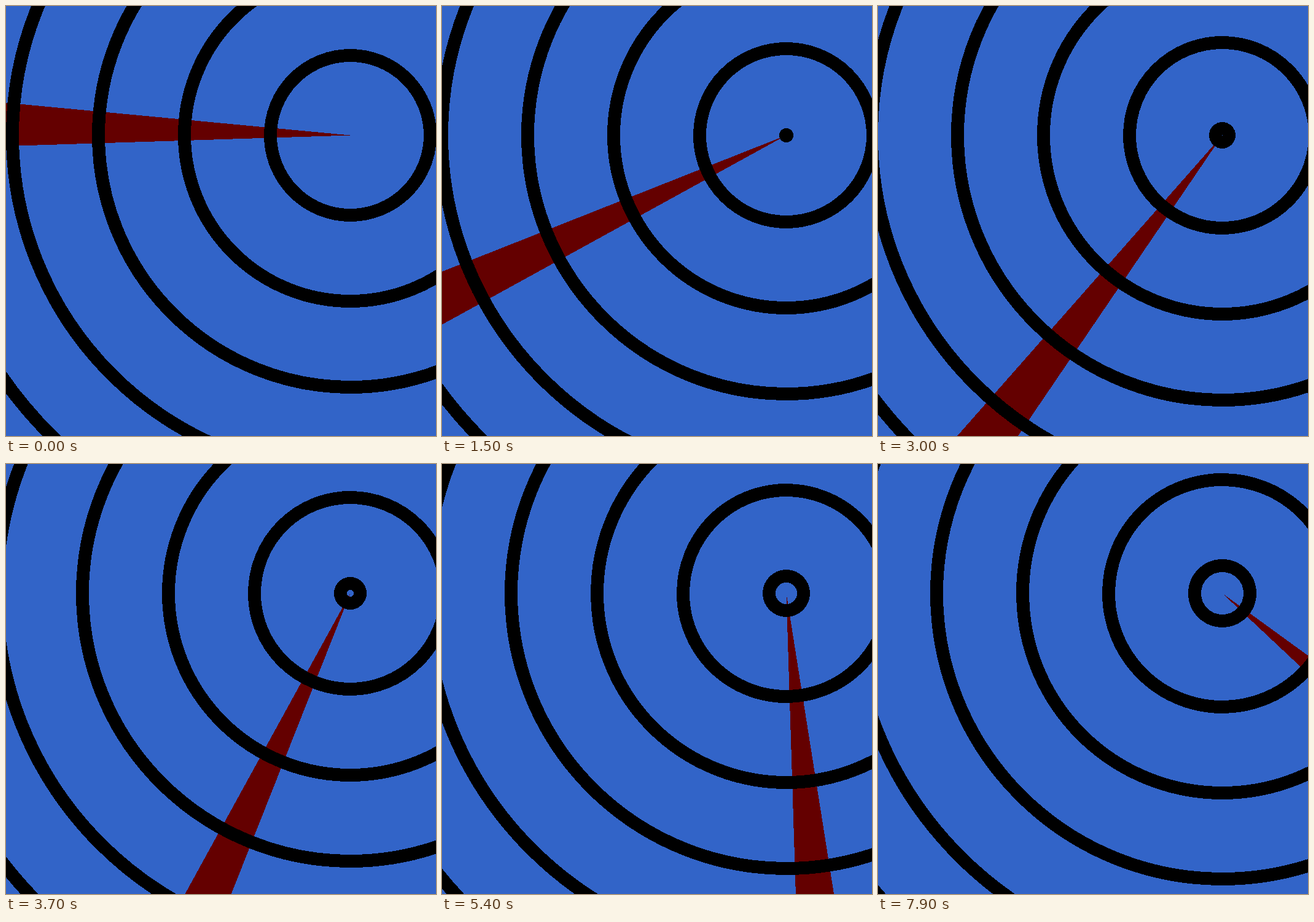
An HTML page that plays this animation: 700 px wide and 700 px high, repeating every 8000 ms.

```html
<!DOCTYPE html>
<html lang="en">
<head>
<meta charset="utf-8">
<title>Radar sweep</title>
<style>
  html, body { margin: 0; width: 100%; height: 100%; overflow: hidden; background: #3264c8; }
  svg { display: block; width: 100%; height: 100%; }
  circle { fill: none; stroke: #000; }
  #beam { fill: #640000; }
</style>
</head>
<body>
<svg viewBox="0 0 700 700" shape-rendering="crispEdges">
  <g id="radar" transform="translate(560.5 210.5)">
    <path id="beam"/>
  </g>
</svg>
<script>
  const STEP_MS = 100, STEPS = 80;
  const GAP = 140, BAND = 21, RING_COUNT = 7;
  const BEAM_START = 178.2, BEAM_SPAN = 7.2, BEAM_STEP = 1.8, REACH = 1000;

  const radar = document.getElementById('radar');
  const beam = document.getElementById('beam');
  const rings = Array.from({ length: RING_COUNT }, () =>
    radar.appendChild(document.createElementNS('http://www.w3.org/2000/svg', 'circle')));

  const rim = degrees => {
    const a = degrees * Math.PI / 180;
    return `${REACH * Math.cos(a)} ${REACH * Math.sin(a)}`;
  };

  function draw(step) {
    const angle = BEAM_START - BEAM_STEP * step;
    beam.setAttribute('d', `M0 0L${rim(angle)}L${rim(angle + BEAM_SPAN)}Z`);

    const growth = Math.round(step * 7 / 10);
    rings.forEach((ring, i) => {
      const outer = growth + GAP * i + 0.5;
      const width = Math.min(BAND, outer);   // a young ring is still a solid dot
      ring.setAttribute('r', outer - width / 2);
      ring.setAttribute('stroke-width', outer > 1 ? width : 0);
    });
  }

  const start = performance.now();
  function tick() {
    const elapsed = Math.max(0, performance.now() - start);
    draw(Math.floor(elapsed / STEP_MS) % STEPS);
    requestAnimationFrame(tick);
  }
  tick();
</script>
</body>
</html>
```
